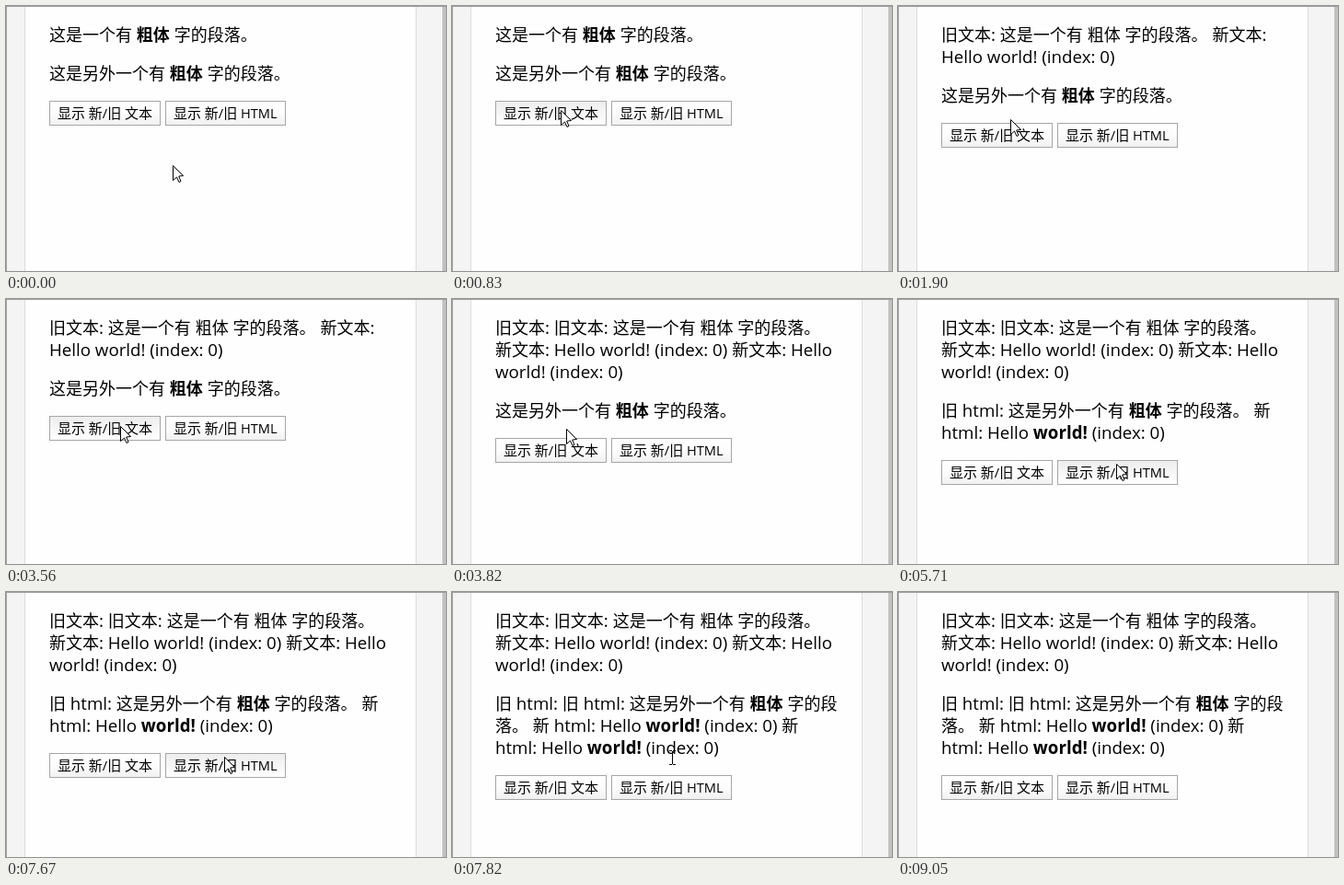
An HTML page with a canvas for the animation above (9920 ms loop, 478 px wide and 288 px high).

```html
<!DOCTYPE html>
<html lang="zh">
<head>
<meta charset="utf-8">
<style>
html, body { margin: 0; width: 100%; height: 100%; overflow: hidden; background: #fff; }
canvas { display: block; }
</style>
</head>
<body>
<canvas id="stage" width="478" height="288"></canvas>
<script>
const ctx = document.getElementById('stage').getContext('2d');
const LOOP = 9920, STEP = 130;
const LEFT = 47, TOP = 21, WIDTH = 374, LINE = 24, GAP = 18;
const CJK = '"Noto Sans CJK SC", "Noto Sans SC", sans-serif';
const LATIN = '"Open Sans", "Noto Sans", sans-serif';

// Clicks on each button, each rewriting its paragraph
const textClicks = [950, 3700], htmlClicks = [5290, 7820];
const textRule = old => `旧文本: ${old.replace(/\*/g, '')} 新文本: Hello world! (index: 0)`;
const htmlRule = old => `旧 html: ${old} 新 html: Hello *world!* (index: 0)`;

// Pointer moves: start, end, x, y
const moves = [
  [150, 280, 118, 113], [1350, 1900, 122, 123], [3430, 3560, 124, 138],
  [3820, 3820, 124, 141], [3980, 4280, 226, 156], [4430, 5010, 228, 161],
  [5450, 5710, 237, 179], [8810, 9050, 440, 320]
];

const rewrite = (text, rule, clicks, t) =>
  clicks.filter(c => c <= t).reduce(rule, text);

function pointerAt(t) {
  let x = 181, y = 173;
  for (const [from, to, toX, toY] of moves) {
    if (t < from) break;
    const steps = Math.round((to - from) / STEP) + 1;
    const step = (to - from) / (steps - 1 || 1) || STEP;
    const done = Math.min(steps, Math.floor((t - from) / step) + 1);
    const k = (done / steps) ** 1.5;
    x += (toX - x) * k;
    y += (toY - y) * k;
  }
  return [Math.round(x), Math.round(y)];
}

// Draws wrapped text, asterisks switch bold; returns the number of lines
function drawText(text, left, baseline, size, latinSize, width = Infinity) {
  let x = left, lines = 1, bold = false;
  ctx.fillStyle = '#000';
  for (const part of text.match(/\*|\s+|[\u3000-\u9fff]|[^\s*\u3000-\u9fff]+/g)) {
    if (part === '*') { bold = !bold; continue; }
    const wide = part >= '\u3000', blank = part === ' ';
    const weight = bold ? 700 : wide ? 350 : 400;
    ctx.font = `${weight} ${wide ? size : latinSize}px ${wide ? CJK : LATIN}`;
    const w = ctx.measureText(part).width;
    if (!blank && !/^[。:]/.test(part) && x + w > left + width) {
      x = left;
      lines++;
    }
    ctx.fillText(part, x, baseline + (lines - 1) * LINE);
    x += w;
  }
  return lines;
}

const drawParagraph = (text, top) =>
  top + drawText(text, LEFT, top + 17, 18, 18.7, WIDTH) * LINE;

function drawButton(x, y, w, label, [px, py]) {
  const hot = px >= x && px < x + w && py >= y && py < y + 27;
  const fill = ctx.createLinearGradient(0, y, 0, y + 27);
  fill.addColorStop(0, hot ? '#ededed' : '#ffffff');
  fill.addColorStop(0.5, hot ? '#f6f6f6' : '#fcfcfc');
  fill.addColorStop(1, hot ? '#ffffff' : '#f0f0f1');
  ctx.fillStyle = fill;
  ctx.fillRect(x, y, w, 27);
  ctx.strokeStyle = '#a6a6a6';
  ctx.lineWidth = 1;
  ctx.strokeRect(x + 0.5, y + 0.5, w - 1, 26);
  drawText(label, x + 9, y + 19, 15, 14.6);
}

function drawArrow(x, y) {
  const shape = [[0, 0], [0, 16], [4, 12.5], [6.5, 18], [8.5, 17], [6.2, 11.5], [11, 11]];
  ctx.beginPath();
  for (const [dx, dy] of shape) ctx.lineTo(x + dx + 0.5, y + dy + 0.5);
  ctx.closePath();
  ctx.fillStyle = '#fff';
  ctx.fill();
  ctx.strokeStyle = '#000';
  ctx.lineWidth = 1;
  ctx.stroke();
}

function drawBeam(x, y) {
  ctx.fillStyle = '#000';
  ctx.fillRect(x + 3, y + 1, 1, 14);
  for (const dy of [0, 15]) {
    ctx.fillRect(x, y + dy, 3, 1);
    ctx.fillRect(x + 4, y + dy, 3, 1);
  }
}

function fillBox(color, x, y, w, h) {
  ctx.fillStyle = color;
  ctx.fillRect(x, y, w, h);
}

function drawPage() {
  fillBox('#f4f4f4', 0, 0, 478, 288);
  fillBox('#dcdcdc', 20, 0, 426, 288);
  fillBox('#fefefe', 21, 0, 424, 288);
  fillBox('#c1c1c1', 474, 0, 4, 288);
  fillBox('#a0a0a0', 0, 0, 1, 288);
  fillBox('#a0a0a0', 0, 0, 478, 1);
}

function draw(t) {
  const pointer = pointerAt(t), [px, py] = pointer;
  drawPage();
  const first = rewrite('这是一个有 *粗体* 字的段落。', textRule, textClicks, t);
  const second = rewrite('这是另外一个有 *粗体* 字的段落。', htmlRule, htmlClicks, t);
  const top = drawParagraph(first, TOP) + GAP;
  const bottom = drawParagraph(second, top);
  const buttonY = bottom + GAP - 2;
  drawButton(47, buttonY, 121, '显示 新/旧 文本', pointer);
  drawButton(173, buttonY, 131, '显示 新/旧 HTML', pointer);
  if (py >= top && py < bottom) drawBeam(px - 1, py - 7);
  else drawArrow(px, py);
}

const start = performance.now();
function tick() {
  draw((performance.now() - start) % LOOP);
  requestAnimationFrame(tick);
}
tick();
</script>
</body>
</html>
```
